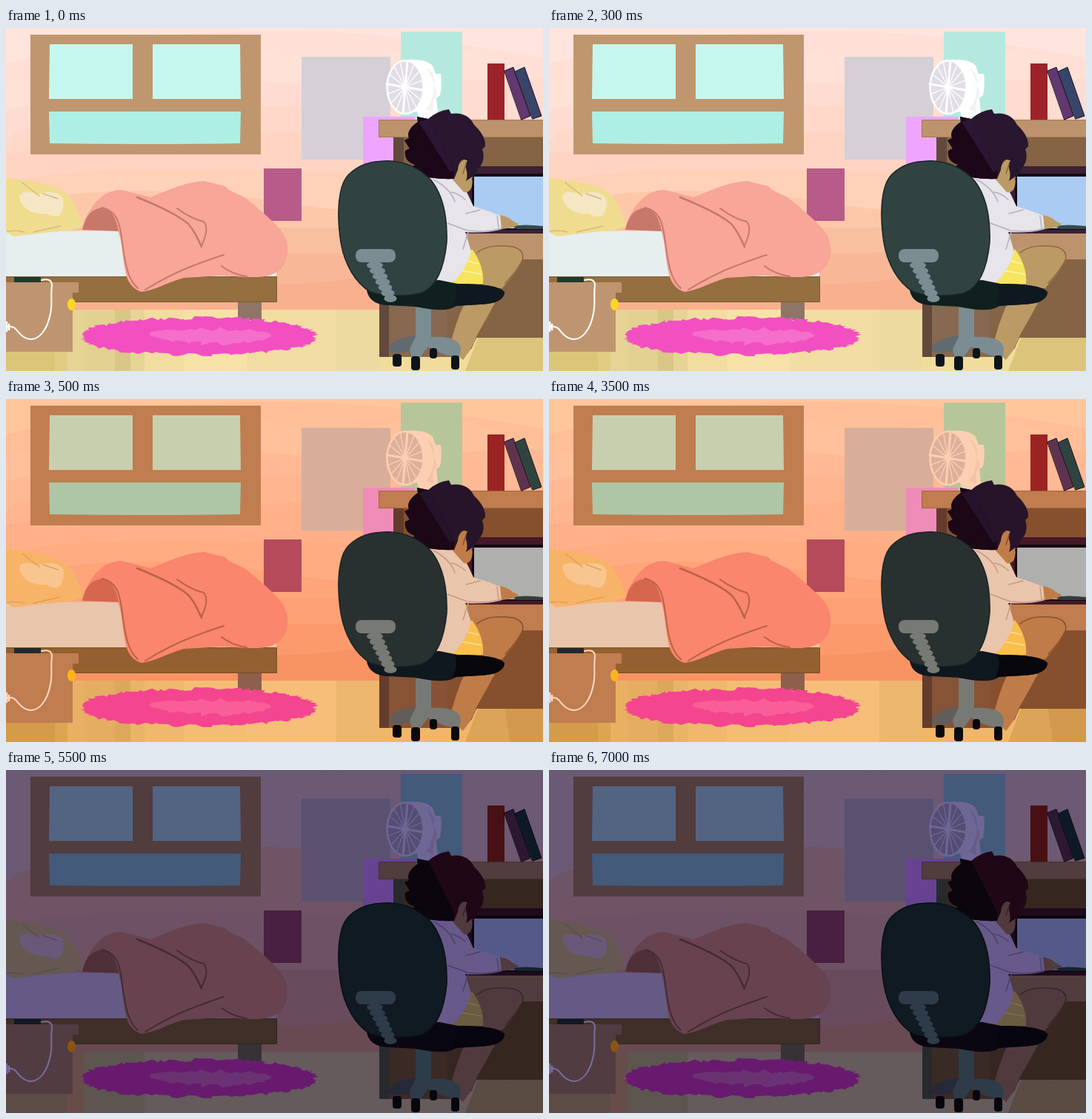
An HTML page that plays this animation: 725 px wide and 464 px high, repeating every 8 s.

```html
<!DOCTYPE html>
<html lang="en">
<head>
<meta charset="utf-8">
<title>Room through the day</title>
<style>
html, body { margin: 0; width: 100%; height: 100%; overflow: hidden; }
svg { display: block; width: 100vw; height: 100vh; }
</style>
</head>
<body>
<svg id="room" viewBox="0 0 725 464" preserveAspectRatio="none" stroke-linecap="round" stroke-linejoin="round"></svg>
<script>
const room = document.getElementById('room');
const LOOP = 8000;
const CHANGES = [0, 500, 5500, LOOP];

// Each colour is listed as day, sunset, night.
const C = {
  frame: '#c0966f #c07d50 #513c3e', pane: '#c5f7ef #c8cfae #536483', lowPane: '#aeefe5 #afc6a5 #435a7b',
  greyPoster: '#d6cfd8 #d8ae9b #5a5170', tealPoster: '#b5e9df #b6c69a #435a7b',
  pinkPoster: '#efa5ff #f08cb8 #674290', plumPoster: '#b75b88 #b64b5b #4a2042',
  bed: '#946f40 #94602f #3f2f28', bedEdge: '#7c592c #774d25 #2f231e', foot: '#8f7565 #8f5f4e #363235',
  sheet: '#e6efee #e9c5ac #655a85', blanket: '#f7a697 #f9866d #67434f', fold: '#c8786a #d5674f #4f3038',
  crease: '#c8786a #b96343 #472a34', pillow: '#f0dc8e #f7b469 #655852', pillowLight: '#f5e6c4 #f9c58f #6a587a',
  pillowLine: '#d0b98e #dca05c #5a4c50', stand: '#be9570 #c07d50 #513c42', phone: '#1f3a2c #232a2c #101826',
  cord: '#ffffff #ffd9c2 #776da0', knob: '#ffd522 #fdb41c #8a5412',
  rug: '#f250c1 #f4458f #681a6f', rugLight: '#f56ecb #f95f96 #6a3272',
  fan: '#ffffff #fdcfb2 #6e6694', fanShade: '#f4f2f6 #f3c4a6 #655c8a', fanBack: '#e2dde5 #dcb09b #554d72',
  desk: '#bd936d #c07d50 #513c3e', deskEdge: '#a47a55 #a3643a #433033', post: '#63493b #633c2c #262a2c',
  back: '#856345 #86502f #352620', drawer: '#876851 #875337 #3a2a26',
  bezel: '#3c2035 #451828 #1e0a1c', screenEdge: '#120818 #12060e #0a040c', screen: '#abccf2 #afafae #555989',
  keys: '#344b4d #303e3c #15232c', redBook: '#9c2329 #9c2324 #471014', plumBook: '#61386f #5f3350 #2c1830',
  blueBook: '#39446a #2f4441 #0d1a25', bookEdge: '#181322 #1b141a #0f0a13',
  skin: '#bc9a66 #c07c48 #513a3e', skinLine: '#8c683c #85502b #38262a',
  hair: '#29162f #281429 #1f0716', hairBand: '#2b1733 #25122b #0b060d', hairDark: '#1c0718 #1b0716 #0b060d',
  shirt: '#e7e4ea #e9c5ac #67598a', shirtLine: '#b5b0c0 #c79a83 #4c416d',
  shorts: '#f7e460 #fabf4c #6a5c40', shortsLine: '#fff4b0 #ffdd94 #7b6d59',
  chair: '#304341 #293130 #101a22', chairEdge: '#17262a #182326 #080f16',
  seat: '#10201f #0f171f #0a0612', seatDark: '#0f1820 #07070c #070510',
  metal: '#7b8c93 #777a74 #2d3c48', metalDark: '#606a6f #625c5a #272838', wheel: '#0c141a #080a0e #08060d'
};

function shape(tag, attrs, colours, prop = 'fill') {
  const el = document.createElementNS('http://www.w3.org/2000/svg', tag);
  for (const key in attrs) el.setAttribute(key, attrs[key]);
  room.append(el);
  const list = (C[colours] || colours).split(' ');
  const steps = CHANGES.map((t, i) => ({
    [prop]: list[Math.min(i, 2)], offset: t / LOOP, easing: 'step-end'
  }));
  el.animate(steps, { duration: LOOP, iterations: Infinity });
}
const path = (d, c) => shape('path', { d }, c);
const line = (d, c, w = 1.5) => shape('path', { d, fill: 'none', 'stroke-width': w }, c, 'stroke');
const box = (x, y, x2, y2, c, rx = 0) => shape('rect', { x, y, width: x2 - x, height: y2 - y, rx }, c);
const oval = (cx, cy, rx, ry, c) => shape('ellipse', { cx, cy, rx, ry }, c);

let seed = 7;
const random = () => (seed = seed * 16807 % 2147483647) / 2147483647;

function wall() {
  box(0, 0, 725, 464, '#ffe5dd #ffc69b #6c5974');
  const bands = [
    ['M0 48Q150 8 330 4T725 40', '#ffdfd6 #ffbe98 #6c5974'],
    ['M0 80Q20 72 34 70L344 30Q450 50 533 30T725 72', '#ffe1d7 #ffc19b #6c5974'],
    ['M0 112Q20 105 34 104L344 72Q460 82 540 76T725 68', '#ffdcd1 #ffba95 #6c5974'],
    ['M0 152Q15 136 34 135L344 104Q400 104 480 115T725 120', '#ffd8ca #ffb58f #6f5466'],
    ['M0 170Q130 150 344 142T725 155', '#ffd4c3 #ffb089 #6f5466'],
    ['M0 208C90 190 210 188 348 193S480 190 725 205', '#ffd1b8 #ffac82 #6d5265'],
    ['M0 243C120 205 290 222 400 240S600 232 725 248', '#fdc8a9 #ffa579 #6d5265'],
    ['M0 270H725', '#f9c0a0 #fea174 #694b5e'],
    ['M0 308C160 292 330 308 450 304S620 300 725 310', '#f8b898 #fb9b6d #694b5e'],
    ['M0 352C160 340 370 355 455 340S600 330 725 340', '#f9b08e #f89364 #694a52']
  ];
  bands.forEach(([d, c]) => path(d + 'V382H0Z', c));
}

function floor() {
  box(0, 381, 725, 464, '#efdca0 #f3bc74 #655a5c');
  [[0, 83, '#e0cc82 #dba551 #5b4c45'], [83, 106, '#e5d494 #e9b064 #674d4a'],
   [106, 147, '#e3d192 #e4ad61 #5c5550'], [147, 168, '#d8c785 #dca85c #5c5550'],
   [168, 187, '#e6d496 #e9b468 #5c5550'], [187, 240, '#f0dd9f #efb86d #655a5c'],
   [240, 325, '#f6e2a7 #f4bd74 #655a5c'], [325, 446, '#f1dda1 #f6be78 #655a5c'],
   [446, 504, '#eddaa0 #edb66f #655a5c'], [504, 635, '#f0dc9b #f0b669 #655a5c']
  ].forEach(([a, b, c]) => box(a, 381, b, 464, c));
  box(0, 438, 66, 464, '#dbc678 #d49b4a #5b4c45');
  path('M620 464L637 419H725V464Z', '#dac57a #dca456 #5a4b43');
  path('M680 464L674 419H725V464Z', '#dac57a #d39a4d #5a4b43');
}

function wallThings() {
  box(33, 9, 344, 171, 'frame');
  path('M59 22H171V96H58Z', 'pane');
  path('M198 22H316L317 96H198Z', 'pane');
  path('M58 113H317L316 156Q190 158 59 156Z', 'lowPane');
  box(399, 39, 519, 178, 'greyPoster');
  box(533, 5, 616, 125, 'tealPoster');
  box(482, 120, 552, 187, 'pinkPoster');
  box(348, 190, 399, 261, 'plumPoster');
}

function bed() {
  box(313, 368, 345, 395, 'foot');
  path('M0 275L155 274L365 330V337H0Z', 'sheet');
  box(0, 336, 366, 371, 'bed');
  line('M0 336.5H365.5V370.5H90', 'bedEdge', 1);
  path('M103 273C108 250 122 229 140 222Q152 217 160 220L195 229C220 219 242 208 268 207L296 214L301 219L322 229Q350 251 368 270Q382 284 380 306Q378 322 366 330Q354 337 340 337H325L290 335L240 338C218 344 201 355 183 357Q169 353 163 337C156 312 158 291 151 274Z', 'blanket');
  path('M103 273C107 254 115 245 130 243Q147 246 152 275Z', 'fold');
  line('M130 243C151 248 154 266 157 290C161 321 165 341 178 352', 'crease', 2);
  line('M177 229C207 241 231 252 246 265Q255 275 264 296', 'crease', 2.5);
  line('M231 244Q248 257 267 262Q275 272 264 294', 'crease', 2);
  line('M188 354Q222 333 254 321T294 307M291 322Q305 333 325 336', 'crease', 2);
  path('M0 204Q8 201 22 206Q51 207 74 219C92 229 95 244 104 266Q94 275 73 275L43 278L10 282L0 276Z', 'pillow');
  path('M18 228Q21 217 42 225Q67 217 77 230Q80 243 72 254Q64 257 54 251C35 253 20 243 18 228Z', 'pillowLight');
  line('M22 209L45 227M50 224L70 231M2 275Q14 273 25 276M37 276L73 268', 'pillowLine');
}

// An oval with a shaggy edge.
function shag(cx, cy, rx, ry, rough, count, c) {
  let d = '';
  for (let i = 0; i < count; i++) {
    const a = i / count * Math.PI * 2;
    const lift = Math.sign(Math.sin(a)) * Math.abs(Math.sin(a)) ** .85;
    const x = cx + Math.cos(a) * rx + (random() - .5) * 9;
    const y = cy + lift * ry * (1 + (random() - .5) * rough);
    d += (i ? 'L' : 'M') + x.toFixed(1) + ' ' + y.toFixed(1);
  }
  path(d + 'Z', c);
}

function rug() {
  shag(260, 417, 158, 25, .22, 170, 'rug');
  shag(282, 417, 74, 10, .6, 60, 'rugLight');
  shag(235, 414, 42, 6, .5, 30, 'rugLight');
}

function nightstand() {
  path('M0 344H98V358H90V438H0Z', 'stand');
  box(11, 337, 47, 344, 'phone');
  oval(88.5, 374, 5.5, 8, 'knob');
  line('M48 341Q62 338 62 348C60 362 63 372 60 386C56 408 45 421 34 421C24 421 18 413 13 407Q9 403 0 404', 'cord', 2);
  line('M1 398V410M4 401V408', 'cord', 2.5);
}

function fan() {
  path('M540 43Q567 41 576 51L580 62H587Q589 77 586 91L581 95Q582 107 584 118L582 124H558L555 113L538 116Z', 'fan');
  path('M568 54Q579 60 578 76Q577 99 567 110L577 115Q574 98 582 90Q576 68 568 54Z', 'fanShade');
  oval(539, 80, 25, 36, 'fanBack');
  for (let i = 0; i < 16; i++) {
    const a = i * Math.PI / 8 + .12;
    line(`M539 80L${539 + 25 * Math.cos(a)} ${80 + 36 * Math.sin(a)}`, 'fan', i % 4 ? 1.3 : 3);
  }
  shape('ellipse', { cx: 539, cy: 80, rx: 24.5, ry: 36, fill: 'none', 'stroke-width': 2.5 }, 'fan', 'stroke');
  oval(538, 80, 4, 5, 'fan');
}

function desk() {
  box(517, 313, 604, 445, 'drawer');
  box(595, 313, 725, 419, 'back');
  box(523, 148, 537, 313, 'post');
  box(504, 313, 517, 445, 'post');
  box(537, 148, 725, 187, 'back');
  box(612, 187, 725, 278, 'bezel');
  box(629, 197, 725, 273, 'screenEdge');
  box(632, 201, 725, 271, 'screen');
  path('M683 268Q700 265 725 268V272H690Z', 'keys');
  box(590, 278, 725, 313, 'desk');
  box(503, 124, 725, 148, 'desk');
  line('M725 124.5H503.5V147.5H725', 'deskEdge', 1);
  box(650, 48, 673, 124, 'redBook');
  for (const [d, c] of [['M673 58L685 53L708 119L696 124Z', 'plumBook'], ['M687 59L700 53L723 119L711 123Z', 'blueBook']]) {
    path(d, c);
    line(d, 'bookEdge', 1);
  }
}

function person() {
  path('M620 370Q605 402 599 434L617 449L628 434C635 412 649 398 660 372Z', 'skin');
  line('M658 376C647 398 637 412 628 434', 'skinLine', 1);
  path('M628 303C643 292 667 293 686 295Q701 300 698 312C693 326 681 339 670 352H625Z', 'skin');
  line('M636 304C649 293 668 294 685 296Q701 301 697 314Q689 330 674 345', 'skinLine');
  path('M629 299Q646 322 644 346H597Z', 'shorts');
  line('M623 315L638 319M614 328L642 333', 'shortsLine');
  path('M566 203H602Q619 213 624 226L631 241L655 249L668 254L670 272Q649 278 620 276L628 302C622 324 611 338 600 346L580 340Z', 'shirt');
  path('M602 195L620 176Q633 187 629 214Q626 224 618 222L603 205Z', 'skin');
  line('M577 205Q600 217 606 235M620 232Q610 223 601 222M623 274L596 264M624 276L617 299M640 246L621 251M663 254L665 270M625 274Q650 277 668 271', 'shirtLine');
  path('M667 253Q678 255 684 261L692 265Q690 270 669 272Z', 'skin');
  path('M555 120L570 123Q582 112 598 110L601 116Q623 113 632 131Q648 146 647 160L643 164Q648 179 638 190L629 207Q632 193 624 180Q612 173 610 192L605 204Q575 205 552 198L559 192L547 189L552 185Q537 180 539 166L545 163L538 152L544 149Q540 138 556 127Z', 'hair');
  path('M555 120L570 123L605 192V204Q575 205 552 198L559 192L547 189L552 185Q537 180 539 166L545 163L538 152L544 149Q540 138 556 127Z', 'hairDark');
  path('M557 127L570 123L605 192L600 195Z', 'hairBand');
  path('M624 178L634 184L634 198L621 207Q625 196 619 186Z', 'hair');
  path('M612 185Q616 177 621 180Q622 190 618 198L612 203Z', 'skin');
  line('M621 184L617 197', 'skinLine');
}

function chair() {
  path('M517 438Q514 421 553 416V432Q537 443 517 438Z', 'metalDark');
  path('M553 378H574V418Q611 416 614 433L613 444H601Q584 440 570 431L558 447H548L545 434L553 418Z', 'metal');
  [[522, 441, 12, 17], [547, 444, 12, 19], [572, 433, 10, 14], [601, 443, 11, 19]]
    .forEach(([x, y, w, h]) => box(x, y, x + w, y + h, 'wheel', 4));
  path('M487 355Q491 374 515 375L553 377Q595 386 608 376L640 374Q673 372 673 357Q664 346 610 346L585 341Z', 'seat');
  path('M606 346Q665 346 673 357Q672 373 640 374L603 376Q611 362 606 346Z', 'seatDark');
  const back = 'M510 180C535 178 560 190 574 206C592 229 596 261 595 290C592 320 584 348 562 358C541 364 509 363 492 357C472 345 457 320 452 290C447 257 448 226 456 208C463 193 482 183 498 181Z';
  path(back, 'chair');
  line(back, 'chairEdge');
  box(472, 299, 526, 317, 'metal', 8);
  for (let i = 0; i < 7; i++) oval(498 + i * 3.5, 321 + i * 7.5, 11 - i * .4, 5, 'metal');
}

[wall, floor, wallThings, bed, rug, nightstand, fan, desk, person, chair].forEach(draw => draw());

// Align every part to one moment so that the palettes change together.
const start = document.timeline.currentTime || 0;
document.getAnimations().forEach(a => { a.startTime = start; });
</script>
</body>
</html>
```
